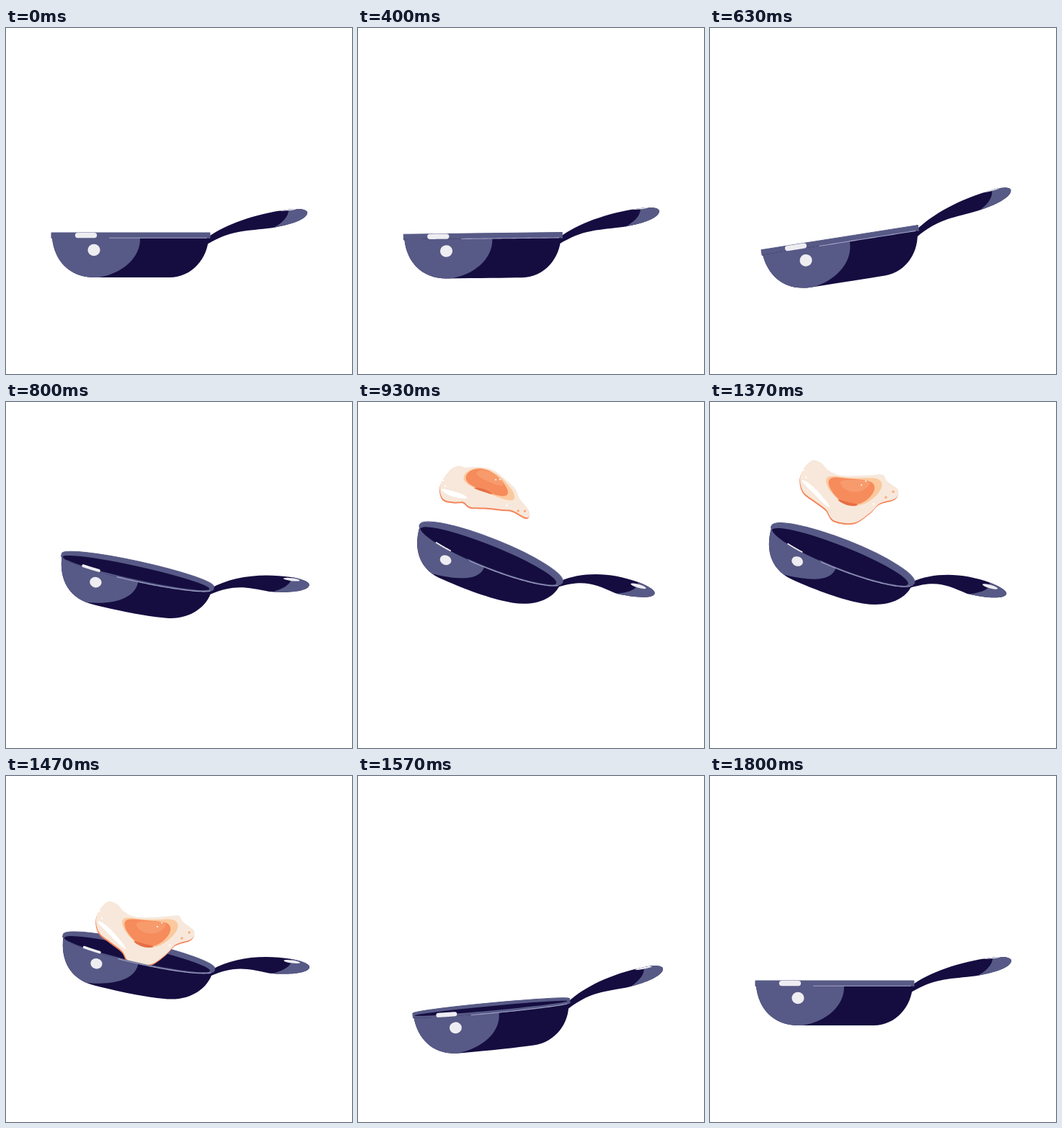
Animation, 480 px wide and 480 px high, one loop 2430 ms. Source, as an HTML page with a canvas:

```html
<!DOCTYPE html>
<html lang="en">
<head>
<meta charset="utf-8">
<title>Egg toss</title>
<style>
html, body { margin: 0; width: 100%; height: 100%; overflow: hidden; background: #fff; }
canvas { display: block; width: 100vw; height: 100vh; }
</style>
</head>
<body>
<canvas id="stage" width="480" height="480"></canvas>
<script>
const ctx = document.getElementById('stage').getContext('2d');
const LOOP = 2430, START = 370, END = 1800, STEP = 33.3;
const DARK = '#150d40', MID = '#575a86', PALE = '#ededf2', LINE = '#a2a2c6';

const REST = { x: 173, y: 287, tilt: 0, rim: 0 };
const PAN = [
  { t: START, ...REST },
  { t: 570, x: 179, y: 301.5, tilt: -11.8, rim: -2 },
  { t: 900, x: 184, y: 212, tilt: 21, rim: 18.5 },
  { t: 1170, x: 188, y: 204, tilt: 25, rim: 26 },
  { t: 1400, x: 184, y: 214.5, tilt: 20.5, rim: 18.5 },
  { t: 1610, x: 185, y: 335, tilt: -8.6, rim: 2 },
  { t: END, ...REST }
];

// Outline of the egg white, in half widths and half heights
const WHITE = [
  [-1, .15], [-.91, -.4], [-.74, -.9], [-.56, -1.03], [-.43, -.93], [-.19, -.98],
  [.18, -1.1], [.49, -.97], [.69, -.82], [.78, -.48], [1, -.06], [.94, .31],
  [.63, .37], [.43, .62], [.1, .94], [-.31, 1.1], [-.47, .84], [-.69, .81], [-.93, .68]
];

const lerp = (a, b, u) => a + (b - a) * u;
const progress = (t, from, span) => Math.min(1, Math.max(0, (t - from) / span));

// Smooth interpolation that never overshoots its keys
function track(keys, t, name) {
  const last = keys.length - 1;
  if (t >= keys[last].t) return keys[last][name];
  const slope = k => (keys[k + 1][name] - keys[k][name]) / (keys[k + 1].t - keys[k].t);
  const tangent = k => {
    if (k === 0 || k === last) return 0;
    const a = slope(k - 1), b = slope(k);
    return a * b <= 0 ? 0 : 2 * a * b / (a + b);
  };
  let i = 0;
  while (t >= keys[i + 1].t) i++;
  const span = keys[i + 1].t - keys[i].t, u = progress(t, keys[i].t, span);
  return lerp(keys[i][name], keys[i + 1][name], u * u * (3 - 2 * u))
    + span * u * (1 - u) * ((1 - u) * tangent(i) - u * tangent(i + 1));
}

function fill(color) {
  ctx.fillStyle = color;
  ctx.fill();
}

function stroke(color, width) {
  ctx.strokeStyle = color;
  ctx.lineWidth = width;
  ctx.stroke();
}

function oval(x, y, rx, ry, color, turn = 0) {
  ctx.beginPath();
  ctx.ellipse(x, y, rx, ry, turn, 0, 7);
  fill(color);
}

// Closed curve through the middles of the spans, pulled out to the points
function blob(points, color) {
  const n = points.length, at = i => points[(i + n) % n];
  ctx.beginPath();
  ctx.moveTo(...points[0]);
  points.forEach((p, i) => {
    const before = at(i - 1), q = at(i + 1), after = at(i + 2);
    ctx.bezierCurveTo(
      p[0] + (q[0] - before[0]) / 6, p[1] + (q[1] - before[1]) / 6,
      q[0] - (after[0] - p[0]) / 6, q[1] - (after[1] - p[1]) / 6, ...q);
  });
  fill(color);
}

function drawEgg(t) {
  const open = progress(t, 930, 240);
  const height = t < 1190 ? 62 * ((1190 - t) / 260) ** 4 : 42 * ((t - 1190) / 180) ** 2.7;
  const slope = .31 - .15 * progress(t, 1170, 200);
  const sag = 25 - 40 * Math.max(0, (1400 - t) / 470) ** 1.4;
  const cx = lerp(175.5, 193, open), w = lerp(62, 68, open), h = lerp(27, 32, open);

  // The middle lags behind the ends, so the egg bends as it flies
  const warp = ([u, v]) =>
    [cx + u * w, 74 + height + u * w * slope + v * h + sag * (1 - u * u) ** 2];
  const patch = (u, v, ru, rv, color, turn = 0) => {
    const ring = Array.from({ length: 24 }, (_, i) => {
      const a = i * Math.PI / 12, x = ru * Math.cos(a), y = rv * Math.sin(a);
      return warp([u + x * Math.cos(turn) - y * Math.sin(turn),
        v + x * Math.sin(turn) + y * Math.cos(turn)]);
    });
    blob(ring, color);
  };
  const dot = (u, v, radius, color) => oval(...warp([u, v]), radius, radius, color);

  const white = WHITE.map(warp);
  blob(white.map(([x, y]) => [x - .7, y + 2]), '#f5855a');
  blob(white, '#f7e8db');
  patch(.1, -.4, .57, .6, '#fbc99d');
  patch(.05, -.4, .47, .56, '#f68b5c');
  patch(.12, -.66, .3, .26, '#f79b6d');
  patch(-.03, .14, .2, .07, '#e66f42', .15);
  patch(-.68, .42, .36, .11, '#fff', .7);
  dot(-.93, -.26, 1.2, '#fff');
  dot(-.88, 0, 1.2, '#fff');
  dot(.5, .3, 1.3, '#fff');
  dot(.75, .2, 1.8, '#f9ae83');
  dot(.9, .02, 1.8, '#f9ae83');
  dot(.25, -.67, 1, '#fff');
  dot(.34, -.8, 1, '#fff');
}

function drawHandle(open) {
  const arch = 6 * open;
  ctx.save();
  ctx.translate(108 * .06 * open, -5 * open);
  ctx.scale(1 - .06 * open, 1);
  ctx.beginPath();
  ctx.moveTo(106, 4);
  ctx.bezierCurveTo(132, -15 - arch, 172, -29 - arch, 217, -35);
  ctx.bezierCurveTo(235, -37.5 + arch / 2, 245, -35 + arch / 2, 245, -31 + arch / 2);
  ctx.bezierCurveTo(245, -20, 214, -12, 190, -9);
  ctx.bezierCurveTo(155, -5 - arch, 139, -6 - arch, 106, 13);
  ctx.closePath();
  fill(DARK);
  ctx.clip();
  ctx.beginPath();
  ctx.moveTo(219 - 5 * open, -40 + arch);
  ctx.bezierCurveTo(221, -26, 212 - 5 * open, -16, 190 - 5 * open, -6);
  ctx.lineTo(260, -6);
  ctx.lineTo(260, -40 + arch);
  fill(MID);
  oval(218, -35 + arch, 12, 1.3 + 1.3 * open, PALE, -.09);
  ctx.restore();
}

function drawPan(t) {
  const [cx, cy, tilt] = ['x', 'y', 'tilt'].map(name => track(PAN, t, name));
  const rim = Math.max(0, track(PAN, t, 'rim'));
  const open = Math.min(1, rim / 24), shut = 1 - open;
  const front = x => 4 * shut + rim * Math.sqrt(Math.max(0, 1 - (x / 110) ** 2));
  const edge = (from, to, offset) => {
    for (let i = 0; i <= 40; i++) {
      const x = lerp(from, to, i / 40);
      ctx.lineTo(x, front(x) + offset);
    }
  };
  const place = () => {
    ctx.setTransform(1 - .035 * open, 0, 0, 1, 0, 0);
    ctx.setTransform(new DOMMatrix().translate(cx, cy).rotate(tilt).scale(1 - .035 * open, 1));
  };

  ctx.save();
  place();
  ctx.lineJoin = 'round';
  drawHandle(open);

  // Rim and inside
  ctx.beginPath();
  ctx.ellipse(0, -3 * shut, 110, rim, 0, Math.PI, 2 * Math.PI);
  edge(110, -110, .6);
  ctx.closePath();
  fill(MID);
  stroke(MID, 1);
  if (rim > .8) oval(-3 * open, .23 * rim, 108 - 4 * open, .77 * rim, DARK);

  // The egg shows only above the front lip
  if (t > 830 && t < 1550) {
    ctx.save();
    ctx.beginPath();
    ctx.moveTo(-300, -400);
    edge(-300, 300, 0);
    ctx.lineTo(300, -400);
    ctx.clip();
    ctx.setTransform(1, 0, 0, 1, 0, 0);
    drawEgg(t);
    ctx.restore();
  }

  // Body, with its lit side clipped to it
  const floor = 59 - 8 * open;
  ctx.save();
  ctx.beginPath();
  edge(-109, 108, 0);
  ctx.bezierCurveTo(107, 32 - 6 * open, 85, floor - 8 * open, 54, floor);
  ctx.bezierCurveTo(30, floor + 6 * open, -5, 59 + open, -50, 59 - open);
  ctx.bezierCurveTo(-85, 59 - open, -106, 36, -109, 4 * shut);
  ctx.closePath();
  fill(DARK);
  ctx.clip();
  ctx.translate(-18 * open, 0);
  ctx.beginPath();
  ctx.moveTo(-120, -10);
  ctx.lineTo(13, -10);
  ctx.lineTo(13, 4 + 20 * open);
  ctx.bezierCurveTo(14, 32 + 10 * open, -12, 55 - 6 * open, -48, 59.5 - 5 * open);
  ctx.lineTo(-120, 64);
  fill(MID);
  ctx.restore();

  // Front lip and highlights
  ctx.beginPath();
  edge(-28, 109, -.4 * open);
  stroke(MID, 1 + open);
  ctx.beginPath();
  edge(-30 + 6 * open, 106, .3);
  stroke(LINE, 1.1);
  ctx.lineCap = 'round';
  ctx.beginPath();
  edge(-73.5 - 6 * open, -50.5 - 6 * open, -3.4 * shut);
  stroke(PALE, 6.6 * shut + .7);
  oval(-51 - 7 * open, 21 + 13 * open, 8.6 - .4 * open, 8.3 - 2 * open, PALE);
  ctx.restore();
}

function frame(now) {
  const t = now % LOOP;
  const stepped = START - 4 + Math.floor((t - START + 8) / STEP) * STEP;
  ctx.clearRect(0, 0, 480, 480);
  drawPan(t < START || t >= END ? START : stepped);
  requestAnimationFrame(frame);
}

requestAnimationFrame(frame);
</script>
</body>
</html>
```
